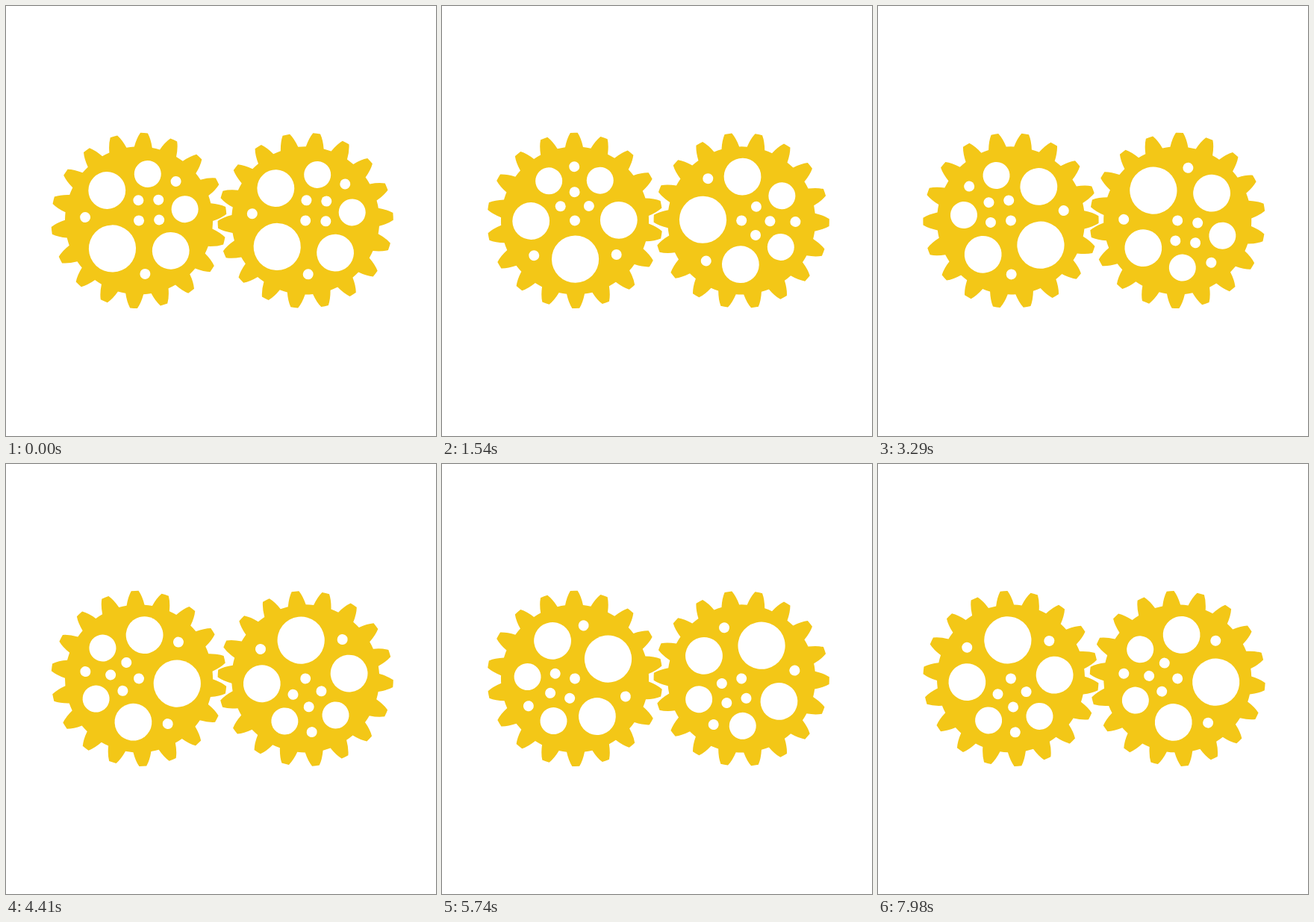
An HTML page that plays this animation: 576x576 px, repeating every 8000 ms.

```html
<!DOCTYPE html>
<html lang="en">
<head>
<meta charset="utf-8">
<title>Gears</title>
<style>
  html, body { margin: 0; width: 100%; height: 100%; overflow: hidden; background: #fff; }
  svg { display: block; width: 100%; height: 100%; }
</style>
</head>
<body>
<svg viewBox="0 0 576 576">
  <defs>
    <g id="gear">
      <path id="rim" fill="#f3c717"/>
      <g id="holes" fill="#fff"></g>
    </g>
  </defs>
  <use id="left" href="#gear"/>
  <use id="right" href="#gear"/>
</svg>
<script>
const LOOP = 8000, STEP = 70, TURN = 2;
const TEETH = 18, ROOT = 99, TIP = 117.7;
const $ = id => document.getElementById(id);

// Place a point given in upright tooth coordinates on tooth number i.
function onTooth(i, x, r) {
  const a = i * 2 * Math.PI / TEETH;
  const px = x * Math.cos(a) + r * Math.sin(a);
  const py = x * Math.sin(a) - r * Math.cos(a);
  return px.toFixed(2) + ' ' + py.toFixed(2);
}

function rimPath() {
  let d = '';
  for (let i = 0; i < TEETH; i++) {
    const p = (x, r) => onTooth(i, x, r);
    d += i ? `A${ROOT} ${ROOT} 0 0 1 ` : 'M';
    d += p(-12, 98.3);
    d += `Q${p(-9.6, 110)} ${p(-4.9, 117.5)}`;
    d += `A${TIP} ${TIP} 0 0 1 ${p(4.9, 117.5)}`;
    d += `Q${p(9.6, 110)} ${p(12, 98.3)}`;
  }
  return d + 'Z';
}

// x, y, radius; holes off the axis are mirrored.
const holes = [
  [0, 0, 7], [0, -38.2, 7], [0, -72.2, 7], [0, 51.7, 31.6],
  [19.1, -19.3, 7], [55.2, 46.2, 7], [34.3, -53.4, 18], [58.8, 0, 24.9]
];

function addHole(x, y, r) {
  const c = document.createElementNS('http://www.w3.org/2000/svg', 'circle');
  c.setAttribute('cx', x);
  c.setAttribute('cy', y);
  c.setAttribute('r', r);
  $('holes').append(c);
}

$('rim').setAttribute('d', rimPath());
for (const [x, y, r] of holes) {
  addHole(x, y, r);
  if (x) addHole(-x, y, r);
}

function pose(id, x, angle) {
  $(id).setAttribute('transform', `translate(${x} 287.4) rotate(${angle})`);
}

function draw(t) {
  const turn = Math.floor(t / STEP) * TURN;
  pose('left', 178, 43.4 - turn);
  pose('right', 401.2, 47.3 + turn);
}

const start = performance.now();
function tick() {
  draw((performance.now() - start) % LOOP);
  requestAnimationFrame(tick);
}
draw(0);
requestAnimationFrame(tick);
</script>
</body>
</html>
```
